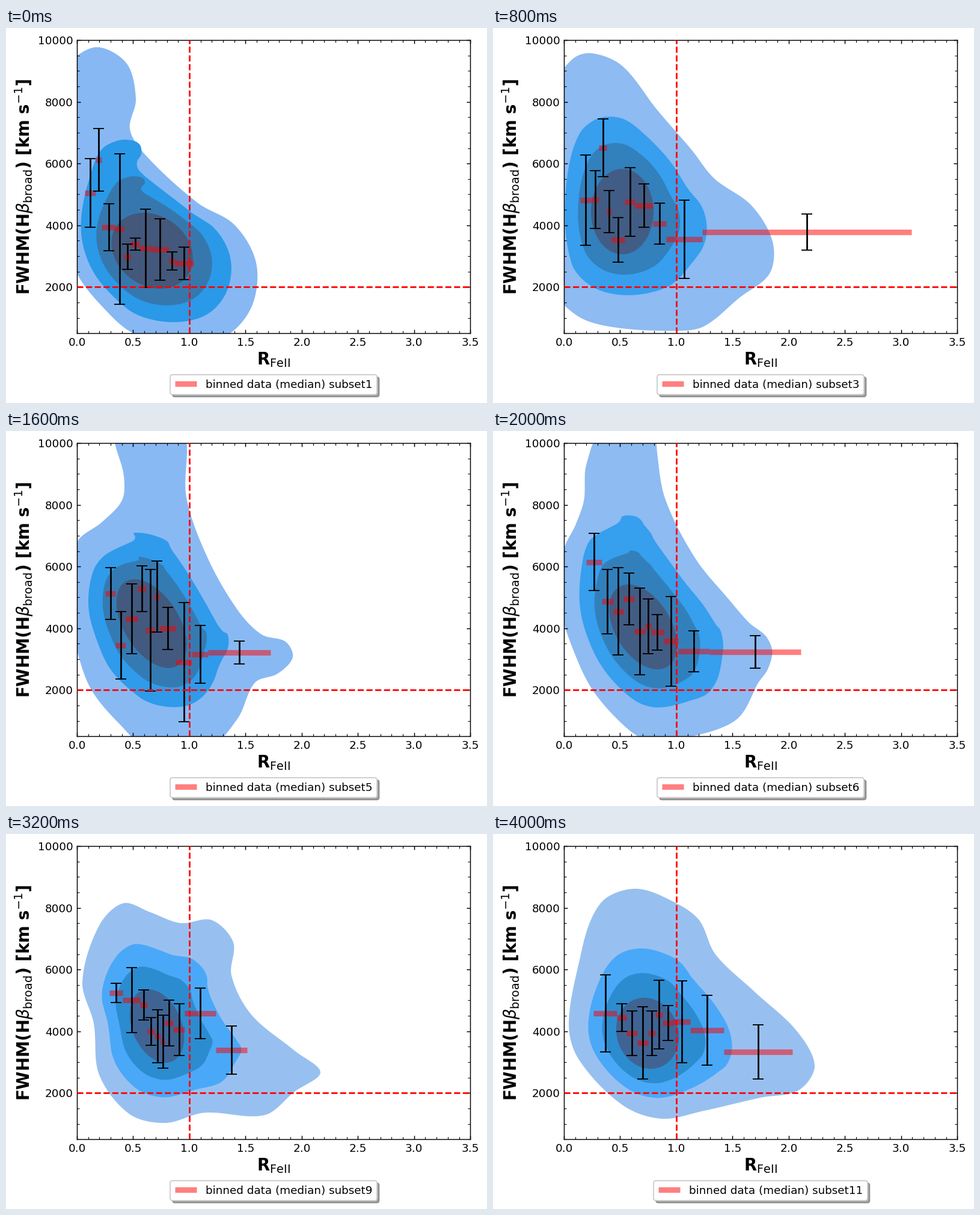
Write a matplotlib script that moves like this. It is 800 by 623 pixels and loops after 4400 ms.

```python
import matplotlib.pyplot as plt
import numpy as np
from matplotlib.animation import FuncAnimation
from matplotlib.colors import to_rgb
from matplotlib.lines import Line2D

WIDTH, HEIGHT, DPI = 800, 623, 132
LEFT, RIGHT, TOP, BOTTOM = 118, 772.2, 20.1, 507.2
X_MAX, Y_MIN, Y_MAX = 3.5, 500, 10000
COUNT, STEP_MS = 11, 400

DEEP = ["#87b8f3", "#2a99e8", "#3678ae", "#43587b"]
PALE = ["#97c0f0", "#4aa8f8", "#2c8cd0", "#3f6494"]

rings, bins, tints = {}, {}, {}


def to_x(px):
    return (np.asarray(px) - LEFT) / (RIGHT - LEFT) * X_MAX


def to_y(py):
    return Y_MAX - (np.asarray(py) - TOP) / (BOTTOM - TOP) * (Y_MAX - Y_MIN)


def smooth(points, samples=400):
    """Closed Hermite curve, evenly sampled from its topmost knot."""
    p = np.array(points, float)
    p = np.roll(p, -p[:, 1].argmin(), axis=0)
    q = np.roll(p, -1, axis=0)
    h = np.hypot(*(q - p).T)[:, None]
    m = (q - np.roll(p, 1, axis=0)) / (h + np.roll(h, 1, axis=0))
    u = np.linspace(0, 1, 20, endpoint=False)[:, None, None]
    curve = ((2*u**3 - 3*u**2 + 1) * p + (u**3 - 2*u**2 + u) * h * m
             + (3*u**2 - 2*u**3) * q + (u**3 - u**2) * h * np.roll(m, -1, axis=0))
    curve = curve.swapaxes(0, 1).reshape(-1, 2)
    curve = np.vstack([curve, curve[:1]])
    s = np.r_[0, np.cumsum(np.hypot(*np.diff(curve, axis=0).T))]
    even = np.linspace(0, s[-1], samples)
    return np.column_stack([np.interp(even, s, c) for c in curve.T])


def density(k, tint, reach, core, outline):
    """Four nested levels: an outline that settles into an elliptic core.

    core is (x, y, long radius, short radius, tilt); reach limits how far
    the middle levels follow the outline away from the core.
    """
    cx, cy, a, b, tilt = core
    outer = smooth(outline)
    offset = outer - (cx, cy)
    dist = np.hypot(*offset.T)
    unit = offset / dist[:, None]
    angle = np.arctan2(*unit.T[::-1]) - np.radians(tilt)
    inner = 1 / np.hypot(np.cos(angle) / a, np.sin(angle) / b)
    gap = dist - inner

    def level(share, limit):
        radius = inner + limit * np.tanh(share * gap / limit)
        return smooth(((cx, cy) + unit * radius[:, None])[:-1:8])

    rings[k] = [outer, level(0.64, reach), level(0.32, reach / 2), level(0, 1)]
    tints[k] = tint


def binned(k, edges, y, dy):
    bins[k] = [np.array(v, float) for v in (edges, y, dy)]


# Key points are in stage pixels.
density(1, 0, 150, (243, 370, 72, 58, 35),
        [(148, 32), (200, 58), (216, 118), (206, 168), (232, 211), (318, 290),
         (380, 327), (416, 390), (409, 462), (365, 512), (290, 525), (212, 507),
         (165, 468), (118, 408), (93, 330), (93, 200), (100, 70)])
binned(1, [131, 149, 159, 182, 196, 207, 222, 241, 271, 280, 312],
       [274, 219, 331, 334, 380, 359, 366, 368, 387, 391],
       [57, 52, 39, 125, 21, 10, 65, 51, 15, 27])

density(3, 0.4, 110, (215, 305, 71, 52, 90),
        [(133, 51), (165, 42), (215, 63), (273, 136), (330, 202), (368, 250),
         (430, 295), (465, 355), (460, 408), (410, 448), (350, 496), (300, 503),
         (200, 497), (140, 478), (100, 430), (92, 250), (104, 95)])
binned(3, [145, 163, 176, 189, 197, 219, 236, 266, 288, 348, 696],
       [286, 285, 199, 305, 352, 289, 295, 325, 351, 339],
       [75, 48, 48, 35, 37, 57, 36, 34, 65, 30])

density(5, 0.15, 85, (242, 320, 82, 46, 58),
        [(240, -40), (296, 0), (300, 110), (335, 210), (385, 297), (425, 338),
         (465, 350), (477, 376), (452, 403), (414, 418), (385, 478), (335, 528),
         (240, 530), (190, 488), (142, 430), (118, 365), (98, 280), (118, 185),
         (160, 151), (193, 115), (196, 75), (182, 0)])
binned(5, [165, 182, 199, 219, 232, 247, 255, 282, 309, 336, 440],
       [270, 356, 312, 262, 331, 275, 328, 384, 371, 368],
       [43, 56, 58, 38, 101, 59, 35, 99, 48, 19])

density(7, 0.6, 250, (257, 331, 73, 47, 60),
        [(205, -15), (240, -5), (246, 50), (273, 116), (335, 205), (405, 268),
         (448, 345), (464, 425), (430, 476), (365, 477), (285, 501), (230, 476),
         (160, 385), (125, 295), (116, 170), (110, 75), (140, 45), (172, 18)])
binned(7, [145, 180, 200, 215, 237, 258, 271, 285, 306, 384, 583],
       [166, 211, 288, 296, 336, 374, 341, 315, 361, 367],
       [52, 51, 87, 48, 43, 32, 24, 50, 20, 35])

density(9, 1, 115, (251, 319, 64, 41, 67),
        [(195, 115), (240, 130), (290, 148), (342, 143), (378, 180), (375, 235),
         (408, 300), (480, 360), (523, 396), (480, 428), (430, 467), (330, 463),
         (265, 480), (205, 465), (155, 400), (146, 315), (127, 245), (155, 152)])
binned(9, [172, 194, 223, 235, 247, 257, 264, 278, 297, 349, 401],
       [264, 276, 284, 328, 336, 345, 314, 325, 298, 359],
       [16, 54, 25, 23, 44, 44, 38, 43, 42, 40])

density(10, 0.3, 160, (262, 314, 86, 54, 65),
        [(180, 26), (245, 57), (305, 115), (322, 180), (360, 245), (430, 290),
         (495, 345), (528, 400), (495, 450), (425, 486), (360, 470), (290, 466),
         (228, 447), (175, 395), (143, 320), (131, 190), (147, 60)])
binned(10, [154, 200, 213, 231, 250, 262, 277, 295, 332, 371, 407],
       [228, 299, 322, 259, 223, 310, 282, 343, 334, 408],
       [59, 92, 50, 78, 76, 69, 60, 21, 50, 23])

density(11, 1, 100, (257, 331, 60, 51, 70),
        [(190, 105), (240, 91), (295, 110), (342, 142), (370, 200), (435, 262),
         (505, 327), (535, 385), (508, 426), (445, 438), (350, 460), (280, 473),
         (215, 450), (143, 375), (126, 315), (146, 200), (164, 140)])
binned(11, [167, 206, 222, 240, 258, 270, 282, 299, 328, 384, 498],
       [298, 305, 331, 347, 331, 300, 314, 312, 326, 362],
       [64, 23, 37, 60, 37, 57, 29, 68, 58, 45])

# The remaining subsets lie midway between their neighbours.
for k in (2, 4, 6, 8):
    for part in (rings, bins):
        part[k] = [(a + b) / 2 for a, b in zip(part[k - 1], part[k + 1])]
    tints[k] = (tints[k - 1] + tints[k + 1]) / 2

plt.rcParams["font.family"] = "DejaVu Sans"
fig = plt.figure(figsize=((WIDTH + 1e-6) / DPI, (HEIGHT + 1e-6) / DPI), dpi=DPI,
                 facecolor="white")
ax = fig.add_axes([LEFT / WIDTH, 1 - BOTTOM / HEIGHT,
                   (RIGHT - LEFT) / WIDTH, (BOTTOM - TOP) / HEIGHT])
ax.set(xlim=(0, X_MAX), ylim=(Y_MIN, Y_MAX), autoscale_on=False)
ax.set_xticks(np.arange(0, 3.6, 0.5))
ax.set_yticks(range(2000, 10001, 2000))
ax.minorticks_on()
ax.tick_params(which="both", direction="in", top=True, right=True)
label_style = dict(fontsize=15, weight="bold", labelpad=2.7)
ax.set_xlabel(r"R$_{\rm FeII}$", **label_style)
ax.set_ylabel(r"FWHM(H$\beta_{\rm broad}$) [km s$^{-1}$]", **label_style)
ax.axvline(1, color="red", ls="--", lw=1.5, zorder=3)
ax.axhline(2000, color="red", ls="--", lw=1.5, zorder=3)
swatch = Line2D([], [], color="red", alpha=0.5, lw=5, solid_capstyle="butt")
drawn = []


def update(i):
    k = i + 1
    while drawn:
        drawn.pop().remove()
    for ring, deep, pale in zip(rings[k], DEEP, PALE):
        mix = np.array(to_rgb(deep)) * (1 - tints[k]) + np.array(to_rgb(pale)) * tints[k]
        drawn.extend(ax.fill(to_x(ring[:, 0]), to_y(ring[:, 1]), color=mix, lw=0))
    edges, y, dy = bins[k]
    middle = (edges[:-1] + edges[1:]) / 2
    drawn.append(ax.hlines(to_y(y), to_x(edges[:-1]), to_x(edges[1:]),
                           color="red", alpha=0.5, lw=5))
    drawn.append(ax.errorbar(to_x(middle), to_y(y), yerr=to_y(y - dy) - to_y(y),
                             fmt="none", ecolor="black", elinewidth=1.5,
                             capsize=5, capthick=1))
    ax.legend([swatch], [f"binned data (median) subset{k}"], loc="upper center",
              bbox_to_anchor=(0.5, -0.123), fontsize=10, shadow=True, fancybox=True)
    return []


anim = FuncAnimation(fig, update, frames=COUNT, interval=STEP_MS, init_func=lambda: [],
                     repeat=True, repeat_delay=0, blit=False)
plt.show()
```
